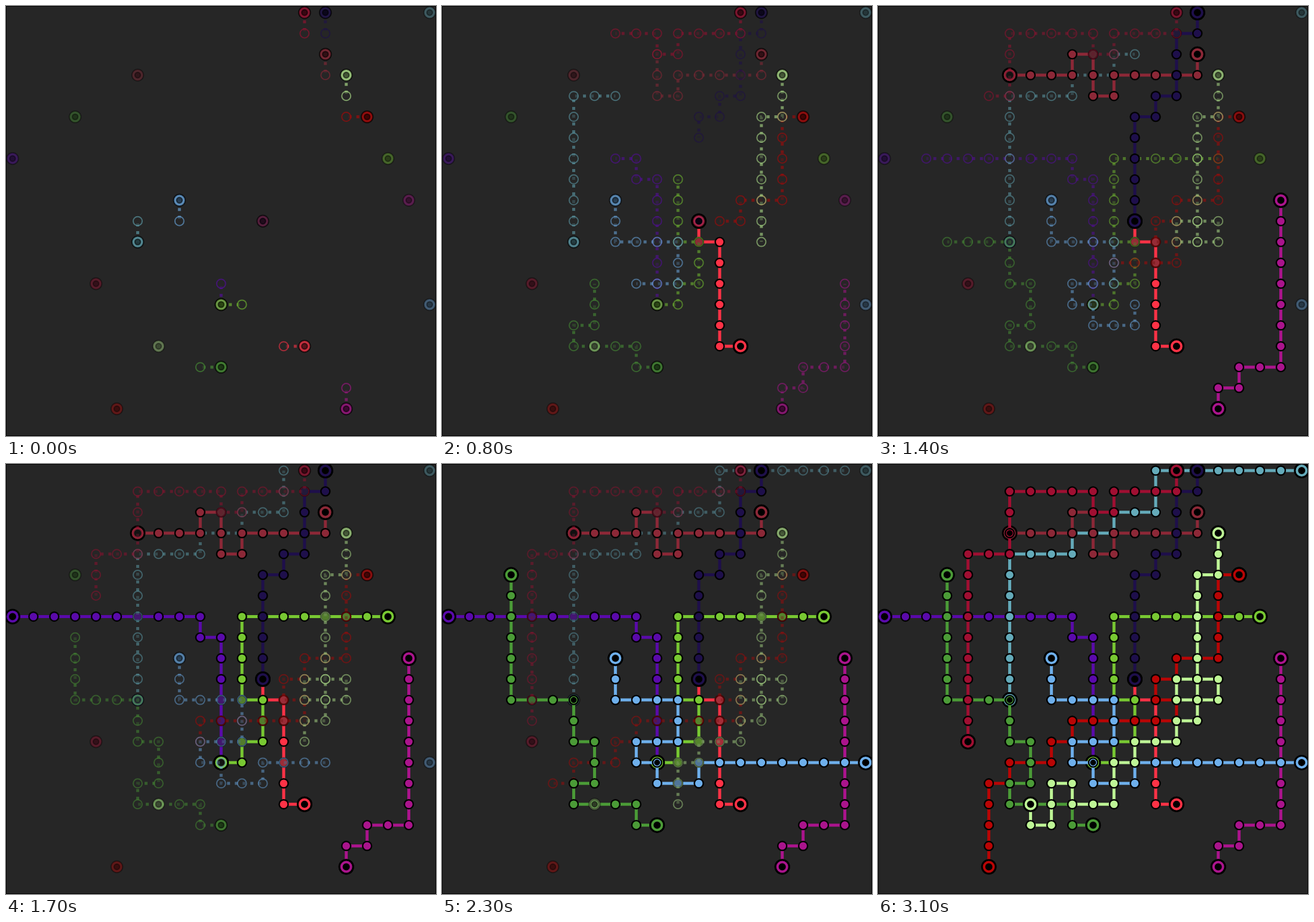
These frames come from a looping animation (720x720 px, 4.1 s). An HTML page with a canvas:

```html
<!DOCTYPE html>
<html lang="en">
<head>
<meta charset="utf-8">
<title>Metro lines</title>
<style>
  html, body { margin: 0; width: 100%; height: 100%; overflow: hidden; background: #262626; }
  canvas { display: block; }
</style>
</head>
<body>
<canvas id="map" width="720" height="720"></canvas>
<script>
const ctx = document.getElementById('map').getContext('2d');
const BACK = '#262626', STEP = 100, LAST = 31, LOOP = 4100;
const DIRS = { u: [0, -1], d: [0, 1], l: [-1, 0], r: [1, 0] };
const place = cell => 11 + cell * 34.92;

// Colour, first cell, and runs of moves; listed from bottom to top.
const lines = [
  ['#5a0aaa', 10, 14, 'u6l1u1l9'],
  ['#aa148c', 16, 19, 'u1r1u1r2u8'],
  ['#ff3246', 14, 16, 'l1u5l1u1'],
  ['#78c832', 10, 14, 'r1u1r1u2l1u4r7'],
  ['#b90505', 17, 5, 'l1d4l2d1l1d1r1d1l5d1l1d1l2d1l1d4'],
  ['#6eafeb', 8, 9, 'd2r3d2l2d1r1d1r2u1r8'],
  ['#64aab9', 6, 11, 'u7r3u1r2u1r2u2r7'],
  ['#4b9b37', 10, 17, 'l1u1l3u1r1u2l1u2l3u6'],
  ['#8c2837', 15, 2, 'd1l4d1l1u2l1d1l3'],
  ['#1e0f4b', 15, 0, 'd1l1d3l1d1l1d5'],
  ['#a00f32', 14, 0, 'd1l3d1l1u1l4d3l2d9'],
  ['#bef596', 16, 3, 'd2l1d6l1u1r2d1l1d1l1d1l2d1l1d2l2u1l1d2l1u1']
].map(([color, x, y, moves]) => {
  const cells = [[x, y]];
  for (const [, dir, count] of moves.matchAll(/([udlr])(\d)/g)) {
    for (let i = 0; i < +count; i++) {
      x += DIRS[dir][0];
      y += DIRS[dir][1];
      cells.push([x, y]);
    }
  }
  return { color, cells };
});
const terminals = new Set(lines.flatMap(({ cells }) => [cells[0], cells.at(-1)].map(String)));

function circle([x, y], radius, fill, stroke, width) {
  ctx.beginPath();
  ctx.arc(place(x), place(y), radius, 0, Math.PI * 2);
  ctx.fillStyle = fill;
  ctx.fill();
  ctx.strokeStyle = stroke;
  ctx.lineWidth = width;
  ctx.stroke();
}

function terminal(cell, color, done) {
  circle(cell, done ? 11.5 : 9.7, color, '#000', done ? 3 : 2);
  circle(cell, done ? 5 : 4.7, '#000', '#000', 2);
}

function drawLine({ color, cells }, step) {
  const done = step + 2 >= cells.length;
  const shown = cells.slice(0, step + 2);
  const pathAlpha = done ? 1 : 0.58 - step * 0.007;

  ctx.globalAlpha = pathAlpha;
  ctx.setLineDash(done ? [] : [5, 8]);
  ctx.beginPath();
  for (const [x, y] of shown) ctx.lineTo(place(x), place(y));
  ctx.strokeStyle = color;
  ctx.lineWidth = 5;
  ctx.stroke();
  ctx.setLineDash([]);

  for (const cell of shown.slice(1, done ? -1 : undefined)) {
    if (done) circle(cell, 7.5, color, '#000', 2.4);
    else circle(cell, 7.5, BACK, color, 2);
    if (done && terminals.has(String(cell))) circle(cell, 4.5, '#000', '#000', 1);
  }

  terminal(cells[0], color, done);
  ctx.globalAlpha = done ? 1 : 0.4;
  terminal(cells[0], color, done);
  terminal(cells.at(-1), color, done);
  ctx.globalAlpha = 1;
}

function draw(now) {
  const step = Math.min(LAST, Math.floor(now % LOOP / STEP));
  ctx.fillStyle = BACK;
  ctx.fillRect(0, 0, 720, 720);
  for (const line of lines) drawLine(line, step);
  ctx.strokeStyle = '#000';
  ctx.lineWidth = 1;
  ctx.strokeRect(0.5, 0.5, 719, 719);
}

let start;
function tick(now) {
  start ??= now;
  draw(now - start);
  requestAnimationFrame(tick);
}
draw(0);
requestAnimationFrame(tick);
</script>
</body>
</html>
```
